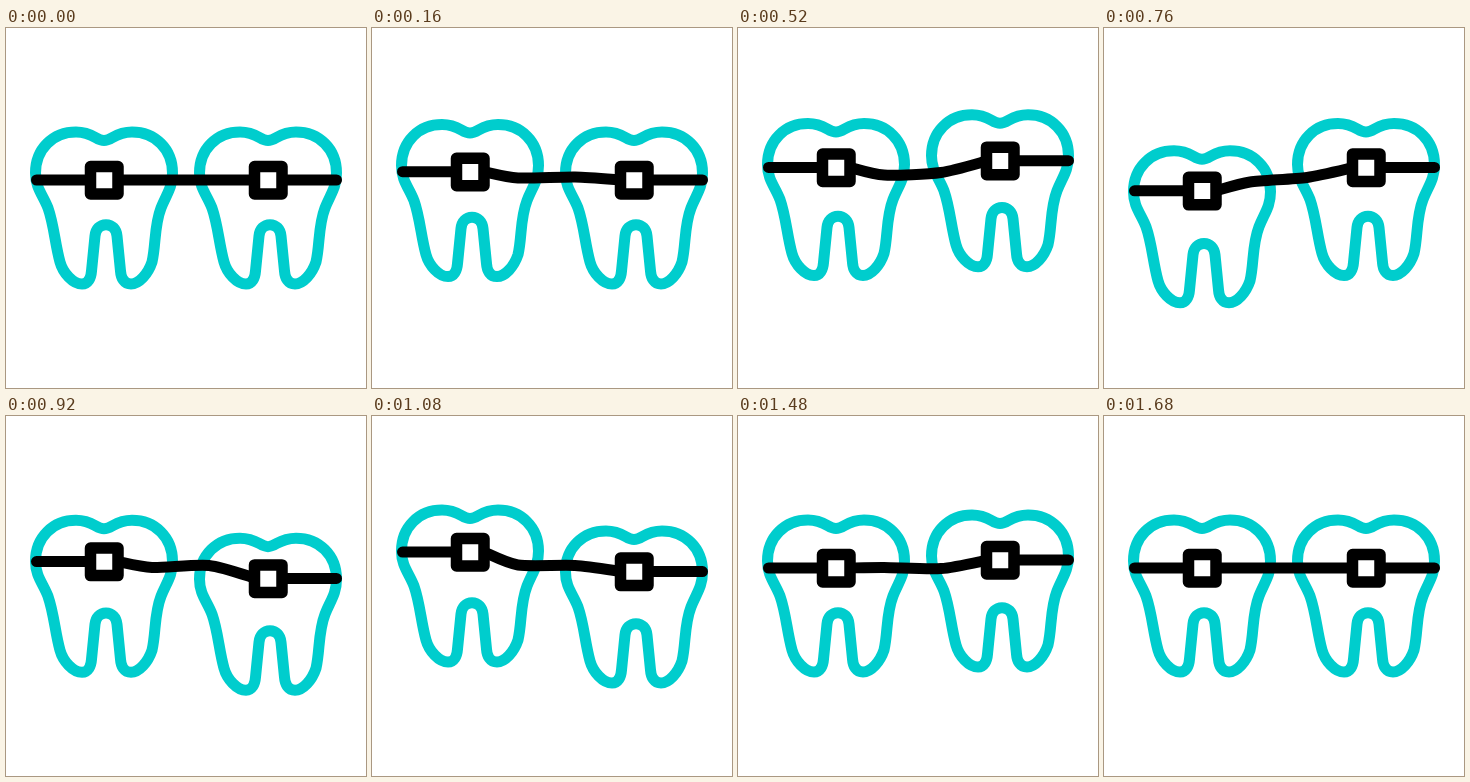
Recreate the animation shown at these times as an HTML page. Size 360 by 360 pixels, loop 2 s.

```html
<!DOCTYPE html>
<html lang="en">
<head>
<meta charset="utf-8">
<title>Braces</title>
<style>
  html, body { margin: 0; width: 100%; height: 100%; overflow: hidden; background: #fff; }
  svg { display: block; width: 100vw; height: 100vh; }
  svg * { stroke-width: 11; stroke-linecap: round; stroke-linejoin: round; }
  .tooth { fill: none; stroke: #00cdcd; }
  .wire { fill: none; stroke: #000; }
  .bracket { fill: #fff; stroke: #000; }
  #bracket { stroke-width: 11.5; }
</style>
</head>
<body>
<svg viewBox="0 0 360 360">
  <defs>
    <path id="tooth" d="M98 112.5C90 112.5 87 104 70 104C47 104 29.5 121 29.5 145
      C29.5 160 37 167 42 180C48 197 49 216 54 234C57 245 67 256 76 256
      C82 256 85 250 85.5 243L89 208C89.7 201 94 196.7 100 196.7C106 196.7 110.3 201 111 208
      L114.5 243C115 250 118 256 125 256C133 256 142 246 146 234C150 217 148 198 155 180
      C160 167 166.5 160 166.5 145C166.5 121 149 104 126 104C109 104 106 112.5 98 112.5Z"/>
    <rect id="bracket" x="84.5" y="138.5" width="27.5" height="27.5"/>
  </defs>
  <use class="tooth" href="#tooth"/>
  <use class="tooth" href="#tooth"/>
  <path class="wire"/>
  <use class="bracket" href="#bracket"/>
  <use class="bracket" href="#bracket"/>
</svg>
<script>
const LOOP = 2000, STEP = 40, LAG = 240, GAP = 164, REST = 152;

// [time, offset] pairs, eased between neighbours
const bounce = (up, down, up2) => [
  [20, 0], [360, up], [410, up], [720, down], [1050, up2], [1070, up2], [1410, 0]
];
const toothKeys = bounce(-20, 20, -10);
const bracketKeys = bounce(-22.5, 12, -16);
const midKeys = [
  [[0, 0], [320, -4], [520, -5], [760, 2], [1080, -3], [1320, -1], [1680, 0]],
  [[0, 0], [320, -6], [520, -7.5], [760, -2.5], [1080, -2.5], [1320, 1], [1680, 0]]
];

const teeth = document.querySelectorAll(".tooth");
const brackets = document.querySelectorAll(".bracket");
const wire = document.querySelector(".wire");

function valueAt(keys, t) {
  if (t <= keys[0][0]) return keys[0][1];
  const i = keys.findIndex(k => k[0] > t);
  if (i < 0) return keys[keys.length - 1][1];
  const [t0, a] = keys[i - 1], [t1, b] = keys[i];
  const p = (t - t0) / (t1 - t0);
  return a + (b - a) * p * p * (3 - 2 * p);
}

// Cardinal spline as cubic segments
function spline(pts) {
  let d = "";
  for (let i = 0; i < pts.length - 1; i++) {
    const p = pts[i], q = pts[i + 1];
    const before = pts[i - 1] || p, after = pts[i + 2] || q;
    const c1 = p.map((v, k) => v + (q[k] - before[k]) / 8);
    const c2 = q.map((v, k) => v - (after[k] - p[k]) / 8);
    d += `C${c1} ${c2} ${q}`;
  }
  return d;
}

function draw(t) {
  const ends = [0, 1].map(i => {
    const local = t - i * LAG;
    const y = valueAt(bracketKeys, local);
    teeth[i].setAttribute("transform", `translate(${i * GAP} ${valueAt(toothKeys, local)})`);
    brackets[i].setAttribute("transform", `translate(${i * GAP} ${y})`);
    return REST + y;
  });
  const [m1, m2] = midKeys.map(keys => REST + valueAt(keys, t));
  const [left, right] = ends;
  const mid = spline([[112, left], [146, m1], [203, m2], [250, right]]);
  wire.setAttribute("d", `M30.5 ${left}H112${mid}H330.5`);
}

const start = performance.now();
function tick() {
  const t = (performance.now() - start) % LOOP;
  draw(Math.floor(t / STEP) * STEP);
  requestAnimationFrame(tick);
}
tick();
</script>
</body>
</html>
```
